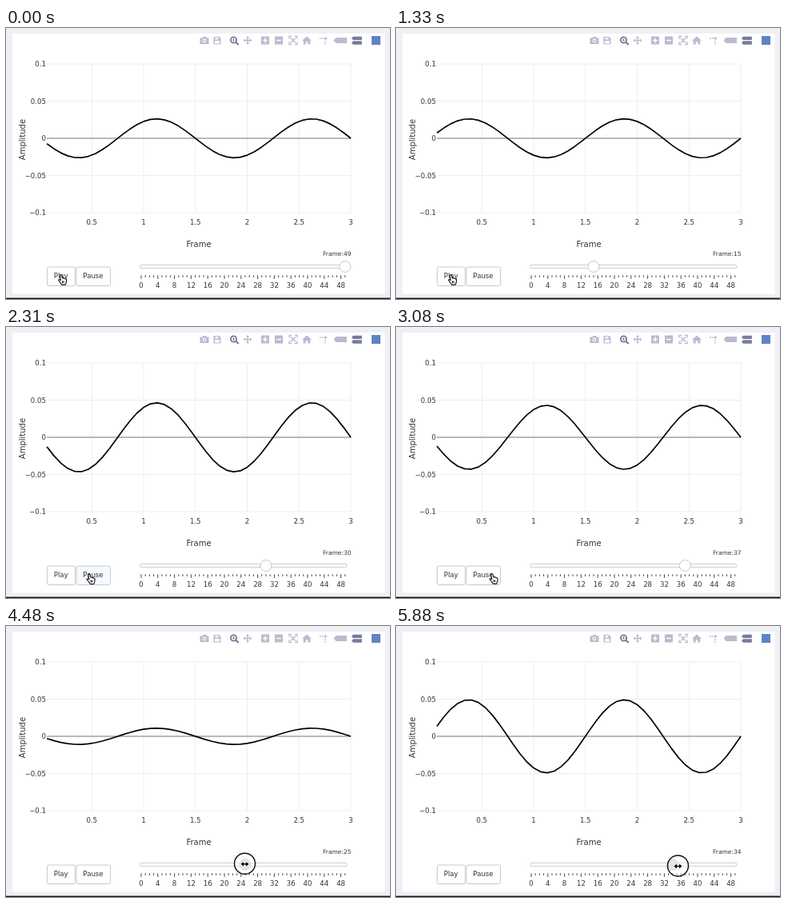
Write an HTML page that moves like this. It is 480 px wide and 339 px high and loops after 5.95 s.

```html
<!DOCTYPE html>
<html lang="en">
<head>
<meta charset="utf-8">
<title>Standing wave</title>
<style>
html, body { margin: 0; width: 100%; height: 100%; overflow: hidden; background: #efeff6; }
svg { display: block; width: 100vw; height: 100vh; }
text { font-family: "DejaVu Sans", Verdana, sans-serif; font-size: 8.6px; fill: #333; }
.mid { text-anchor: middle; }
.end { text-anchor: end; }
.btn { stroke: #c6cad2; fill: #fff; }
</style>
</head>
<body>
<svg id="stage" viewBox="0 0 480 339">
  <rect width="480" height="339" fill="#efeff6"/>
  <rect x="8" y="7" width="465.5" height="325.5" fill="#fff"/>
  <rect y="337.6" width="480" height="1.4" fill="#111"/>

  <g id="tools" fill="#b9bbcf" stroke="none">
    <path d="M242.5 12.5h3l1-1.5h3.5l1 1.5h2.5v7.5h-11z"/>
    <circle cx="248" cy="16" r="2.4" fill="#fff"/><circle cx="248" cy="16" r="1.3"/>
    <path d="M259.5 11h7l2 2v7.5h-9z"/>
    <path d="M261.5 12h4v2.4h-4zM261 16h6v3.5h-6z" fill="#fff"/>
    <g fill="none" stroke="#777b9c">
      <circle cx="284.5" cy="15" r="3.6" stroke-width="1.9"/>
      <path d="M287.3 17.8l3.4 3.2" stroke-width="2.2"/>
      <path d="M282.8 15h3.4M284.5 13.3v3.4" stroke-width=".9"/>
    </g>
    <path d="M302 10l2.2 2.5h-1.5v2.3h2.3v-1.5l2.5 2.2-2.5 2.2v-1.5h-2.3v2.3h1.5l-2.2 2.5-2.2-2.5h1.5v-2.3H299v1.5l-2.5-2.2 2.5-2.2v1.5h2.3v-2.3h-1.5z"/>
    <path d="M319 10.5h10v10h-10zM336 10.5h10v10h-10z"/>
    <path d="M321 15.5h6M324 12.5v6M338 15.5h6" stroke="#fff" stroke-width="1.5"/>
    <path d="M354 13.5v-3h3M361 10.5h3v3M364 17.5v3h-3M357 20.5h-3v-3M356 12.5l6 6M362 12.5l-6 6" fill="none" stroke="#b9bbcf" stroke-width="1.4"/>
    <path d="M370 15.8l6-5.3 6 5.3h-1.7v4.7h-3v-3.2h-2.6v3.2h-3v-4.7z"/>
    <path d="M392 13h7M399 13v8" fill="none" stroke="#b9bbcf" stroke-width="1.4" stroke-dasharray="1.8 1.1"/>
    <circle cx="399.5" cy="12.8" r="1.5"/>
    <path d="M409.5 15.5l3-3.6h13.5v7.2h-13.5z"/>
    <path d="M432 13l2-2.3h10.8v4.4H434zM432 18.6l2-2.3h10.8v4.4H434z" fill="#777b9c"/>
    <rect x="457" y="10" width="11" height="11" fill="#5f83c4"/>
  </g>

  <g id="grid" stroke="#eee"></g>
  <path d="M51 138H431" stroke="#777" stroke-width="1.2"/>
  <path id="wave" fill="none" stroke="#000" stroke-width="1.7" stroke-linejoin="round"/>
  <g id="labels"></g>
  <text class="mid" x="241" y="273.8" style="font-size:10px">Frame</text>
  <text class="mid" transform="translate(24.2 139.5) rotate(-90)" style="font-size:10px">Amplitude</text>

  <rect class="btn" x="51.5" y="299" width="35" height="23.5" rx="2"/>
  <rect class="btn" id="pause" x="88" y="299" width="42.5" height="23.5" rx="2"/>
  <text class="mid" x="68.7" y="313.2">Play</text>
  <text class="mid" x="109" y="313.2">Pause</text>

  <text class="end" id="caption" x="431.5" y="285" style="font-size:7.5px"></text>
  <rect x="167.5" y="296.3" width="258.5" height="4.4" rx="2.2" fill="#fafafc" stroke="#cbced6"/>
  <g id="ticks" stroke="#333" stroke-width=".9"></g>
  <circle id="knob" cy="298.5" r="7" stroke="#c3c9d3"/>
  <circle id="press" r="13" fill="#fff" fill-opacity=".35" stroke="#111" stroke-width="1.4"/>

  <path id="hand" fill="#fff" stroke="#111" stroke-width="1.1" stroke-linejoin="round"
    d="M-3.2 -5.2q1.4 -1.6 2.2 .3l1 3.4q1.2 -.9 1.8 .3q1.3 -.6 1.8 .6q1.4 -.2 1.5 1.2l-.3 3.2l-1 2.8h-4.6l-2.4 -3.4l-1.7 -2.3q.4 -1.5 2 -.4l.7 .6z M0 2v2.6M1.6 2v2.6"/>
  <path id="arrow" fill="#111" stroke="#fff" stroke-width=".7" d="M-3 -6v11l2.6-2.4 1.8 4 1.8-.8-1.8-3.9h3.4z"/>
  <path id="resize" fill="#000" stroke="#fff" stroke-width="1" paint-order="stroke"
    d="M-5 0l3.4-2.9v2.1h3.2v-2.1l3.4 2.9-3.4 2.9v-2.1h-3.2v2.1z"/>
</svg>
<script>
const LOOP = 5950, STEP = 70, RATE = 1.084, PEAK = 0.05;
const $ = id => document.getElementById(id);
const px = x => 431 - (3 - x) * 129.5;
const py = y => 138 - y * 930;
const slot = n => 169 + n * 5.2;

// [time, value]: position along the cycle, pointer x and pointer y
const phase = [[350, 0], [1330, 15], [2310, 30.08], [2742, 36.72], [4130, 36.72],
  [4480, 25.88], [4900, 14.9], [5180, 14.9], [5390, 22.45], [5880, 33.5]];
const mouseX = [[1890, 70.5], [2170, 106], [2310, 106], [2590, 122], [3080, 122], [3780, 361],
  [4130, 361], [4480, 298.5], [4900, 244], [5180, 244], [5390, 284.5], [5880, 352.5]];
const mouseY = [[1890, 314.5], [2170, 315], [2590, 314.5], [3080, 314.5], [3780, 298],
  [5390, 297.5], [5880, 300.5]];

function along(keys, t) {
  if (t <= keys[0][0]) return keys[0][1];
  for (let i = 1; i < keys.length; i++) {
    const [a, p] = keys[i - 1], [b, q] = keys[i];
    if (t <= b) return p + (q - p) * (t - a) / (b - a);
  }
  return keys[keys.length - 1][1];
}

function buildAxes() {
  let grid = "", labels = "", ticks = "";
  for (let i = 1; i <= 6; i++) {
    const x = px(i / 2);
    grid += `<path d="M${x} 45V231"/>`;
    labels += `<text class="mid" x="${x}" y="246.4">${i / 2}</text>`;
  }
  for (let i = -2; i <= 2; i++) {
    const y = py(i / 20), name = String(i / 20).replace("-", "\u2212");
    if (i) grid += `<path d="M51 ${y}H431"/>`;
    labels += `<text class="end" x="50" y="${y + 3}">${name}</text>`;
  }
  for (let n = 0; n < 50; n++) {
    const major = n % 4 === 0;
    ticks += `<path d="M${slot(n)} 309.3v${major ? 4.6 : 2.6}"/>`;
    if (major) labels += `<text class="mid" x="${slot(n)}" y="325">${n}</text>`;
  }
  $("grid").innerHTML = grid;
  $("labels").innerHTML = labels;
  $("ticks").innerHTML = ticks;
}

function wavePath(amp) {
  let d = "";
  for (let i = 1; i <= 45; i++) {
    const x = i / 15, y = amp * Math.sin(2 * Math.PI * x / 1.5);
    d += (i > 1 ? "L" : "M") + px(x).toFixed(2) + " " + py(y).toFixed(2);
  }
  return d;
}

function place(id, on, x, y) {
  $(id).setAttribute("visibility", on ? "visible" : "hidden");
  $(id).setAttribute("transform", `translate(${x} ${y})`);
}

function draw(t) {
  const u = t < 350 ? 48.76 : along(phase, t);
  const drag = t >= 4130;
  const n = Math.round(drag && t <= 5180 ? u - 0.5 : u);
  const x = along(mouseX, t), y = along(mouseY, t);
  const click = (t >= 280 && t < 420) || (t >= 2660 && t < 2800);

  $("wave").setAttribute("d", wavePath(-PEAK * Math.sin(RATE * u)));
  $("caption").textContent = "Frame:" + n;
  $("knob").setAttribute("cx", slot(n));
  $("knob").setAttribute("fill", drag ? "#d9d9d9" : "#fff");
  $("pause").style.fill = t > 1960 && t < 2730 ? "#f4faff" : "#fff";

  const onKnob = x > 354 || drag, onButton = x < 131;
  place("press", drag || click, x, drag ? y - 0.5 : y + 1.5);
  place("hand", onButton && !drag, x, y);
  place("arrow", !onButton && !onKnob, x, y);
  place("resize", onKnob, x, y);
}

buildAxes();
const start = performance.now();
function tick() {
  const t = (performance.now() - start) % LOOP;
  draw(Math.floor(t / STEP) * STEP);
  requestAnimationFrame(tick);
}
tick();
</script>
</body>
</html>
```
